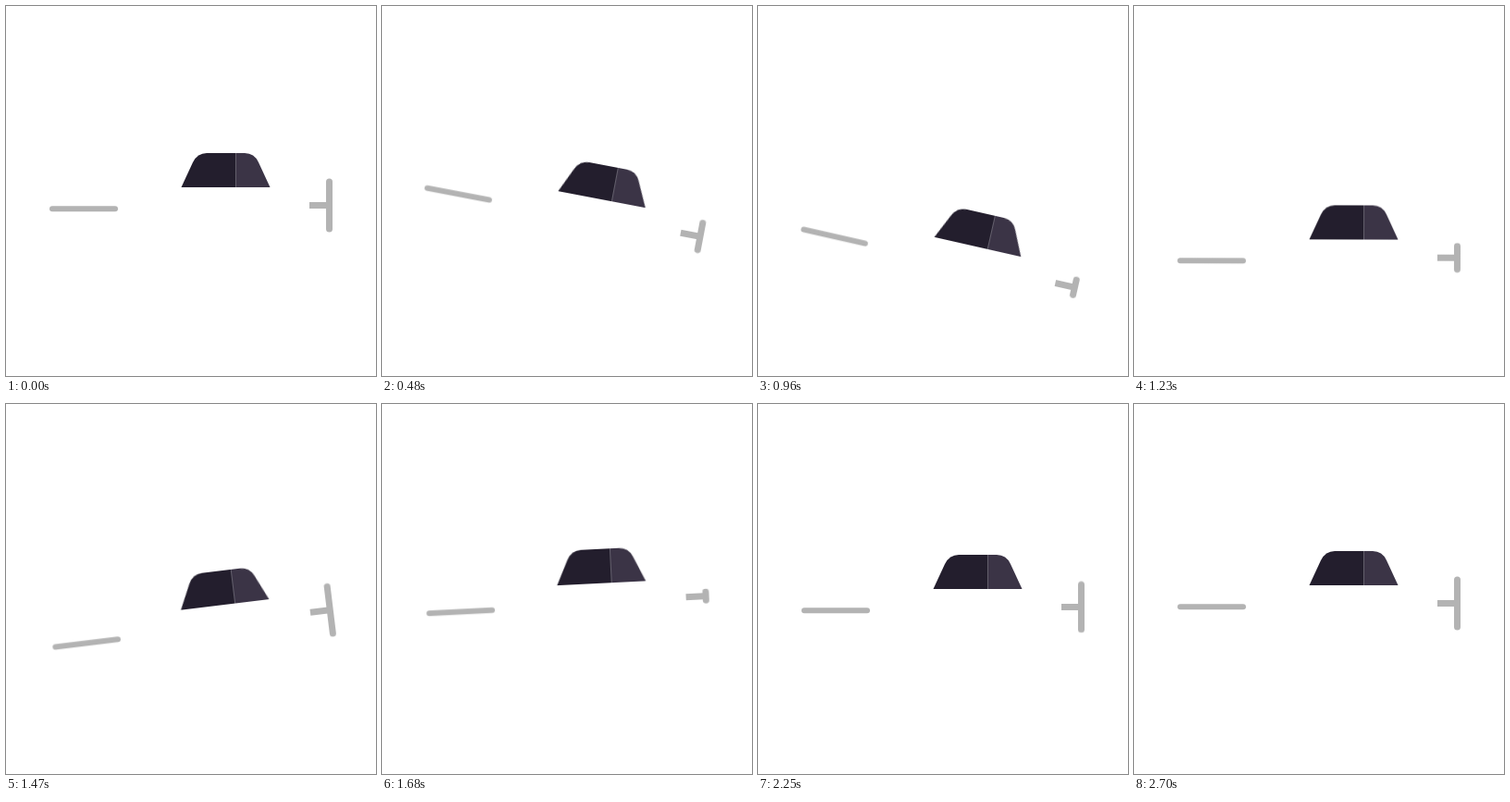
An HTML page without scripts for the animation above (2760 ms loop, 400x400 px).

```html
<!DOCTYPE html>
<html lang="en">
<head>
<meta charset="utf-8">
<title>Plane</title>
<style>
  html, body { margin: 0; width: 100%; height: 100%; overflow: hidden; background: #fff; }
  svg { display: block; width: 100%; height: 100%; }

  .lift, .pitch, .prop { animation: lift 2760ms cubic-bezier(.333, 0, .667, 1) infinite; }
  .pitch { animation-name: pitch; transform-origin: 200px 200px; }

  /* a spinning blade seen from the side: its height follows a cosine */
  .prop {
    animation-name: spin;
    animation-timing-function: cubic-bezier(.364, 0, .636, 1);
    transform-origin: 349.5px 215.5px;
    vector-effect: non-scaling-stroke;
  }

  .metal { fill: none; stroke: #b3b3b3; stroke-width: 7; }
  .round { stroke-linecap: round; }

  @keyframes lift {
    0%, 11.957% { transform: translateY(0); }
    40.217% { transform: translateY(62px); }
    64.855% { transform: translateY(-5px); }
    81.522% { transform: translateY(4px); }
    97.826%, 100% { transform: translateY(0); }
  }
  @keyframes pitch {
    0%, 1.087% { transform: rotate(0deg); }
    28.261% { transform: rotate(16.6deg); }
    53.986% { transform: rotate(-7deg); }
    66.304%, 100% { transform: rotate(0deg); }
  }
  @keyframes spin {
    0%, 26.74%, 53.48%, 80.22% { transform: scaleY(1); }
    13.37%, 40.11%, 66.85% { transform: scaleY(-1); }
    93.59% { transform: scaleY(-1); animation-timing-function: cubic-bezier(.35, 0, .67, .45); }
    97.82% { transform: scaleY(-.545); animation-timing-function: step-end; }
    97.826%, 100% { transform: scaleY(1); }
  }
</style>
</head>
<body>
<svg viewBox="0 0 400 400">
  <g class="lift">
    <g class="pitch">
      <path class="metal round" stroke-width="6" style="stroke-width:6" d="M50 219.2H118"/>
      <path fill="#231e2d" d="M189.5 196L202 169Q207 159 217 159H248.5V196Z"/>
      <path fill="#3b3446" d="M248.5 159H258Q268.500 159 273 169L285.500 196H248.500Z"/>
      <path class="metal" d="M328 215.5H349.5"/>
      <path class="metal round prop" d="M349.5 190V241"/>
    </g>
  </g>
</svg>
</body>
</html>
```
